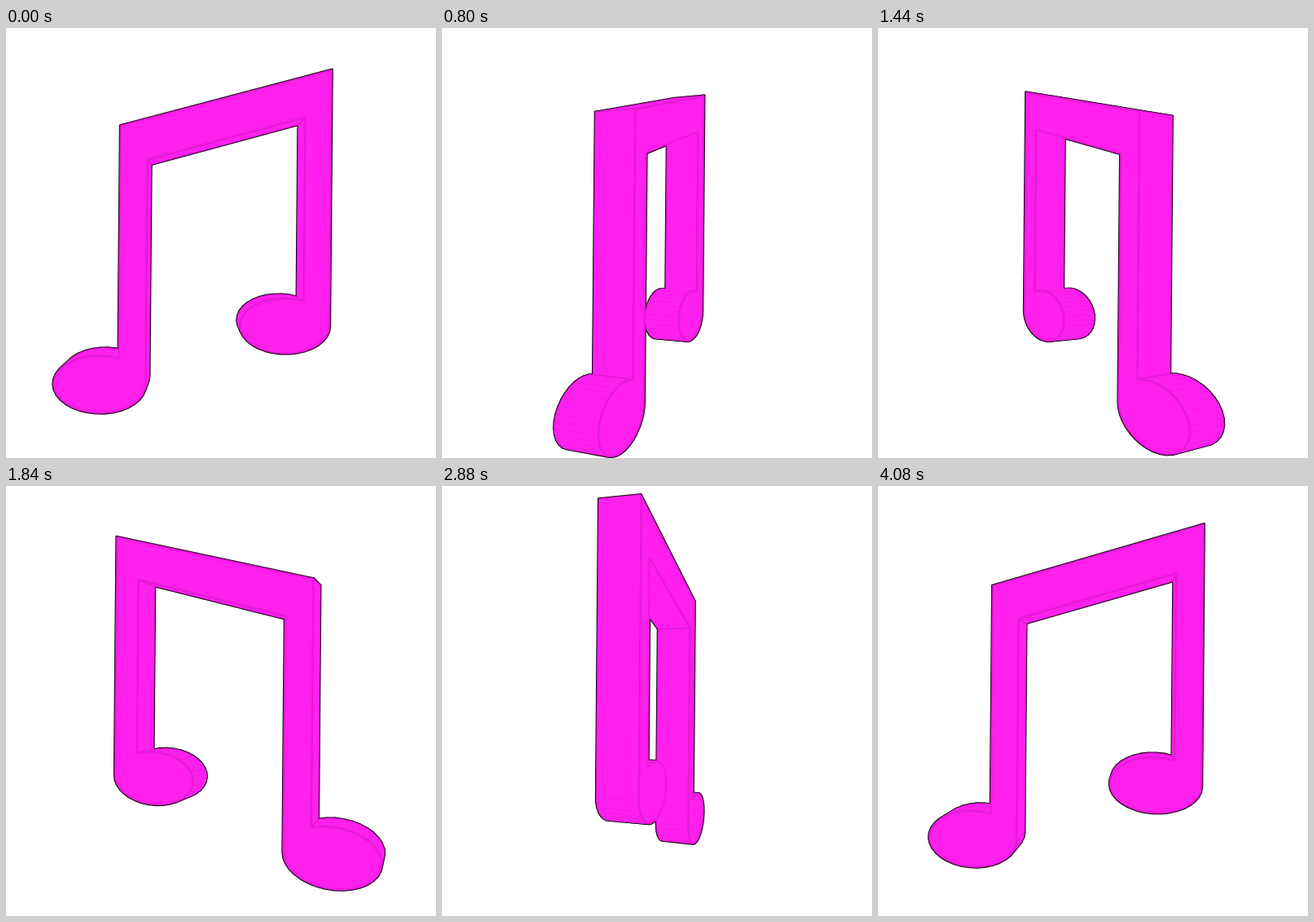
Recreate the animation shown at these times as an HTML page with a canvas. Size 528 by 528 pixels, loop 4160 ms.

```html
<!DOCTYPE html>
<html>
<head>
<meta charset="utf-8">
<title>Turning note</title>
<style>
html, body { margin: 0; width: 100%; height: 100%; overflow: hidden; background: #fff; }
canvas { display: block; }
</style>
</head>
<body>
<canvas id="stage" width="528" height="528"></canvas>
<script>
const ctx = document.getElementById('stage').getContext('2d');
const STEP = 80, STEPS = 52;
const EYE = 680, HALF = 22.5;
const MID_X = 262, MID_Y = 252;
const PINK = '#ff20ee', SHADE = 'rgba(140,0,130,0.16)';

// Outline of the note, clockwise, seen from the front
const outline = [];

function corner(x, y) {
  outline.push({ x, y, sharp: true });
}

// Note head: from its right end, below and around, up to the stem at stemX
function head(cx, cy, rx, ry, stemX) {
  const end = 2 * Math.PI - Math.acos((stemX - cx) / rx);
  const n = 28;
  for (let i = 0; i <= n; i++) {
    const a = end * i / n;
    outline.push({ x: cx + rx * Math.cos(a), y: cy + ry * Math.sin(a), sharp: i === n });
  }
}

corner(-119, -120.5);
corner(132.5, -186);
head(78.25, 103.5, 54.25, 31.5, 100);
corner(100, -131);
corner(-86, -81.5);
head(-140.5, 172.5, 54.5, 33, -119);

function project(p, z, angle) {
  const c = Math.cos(angle), s = Math.sin(angle);
  const depth = z * c - p.x * s;
  const k = EYE / (EYE - depth);
  const x = (p.x * c + z * s) * k;
  const y = p.y * (k + 0.055);
  return {
    x: MID_X + x - 0.0085 * y,
    y: MID_Y + y + x * (0.013 + 0.00007 * p.y),
    depth
  };
}

function area(pts) {
  return pts.reduce((sum, p, i) => {
    const q = pts[(i + 1) % pts.length];
    return sum + p.x * q.y - q.x * p.y;
  }, 0);
}

function trace(pts) {
  ctx.beginPath();
  pts.forEach(p => ctx.lineTo(p.x, p.y));
  ctx.closePath();
}

function stroke(color, width) {
  ctx.strokeStyle = color;
  ctx.lineWidth = width;
  ctx.stroke();
}

function paint(pts) {
  trace(pts);
  ctx.fillStyle = PINK;
  ctx.fill();
  stroke(PINK, 0.6);
}

function crease(a, b) {
  ctx.beginPath();
  ctx.moveTo(a.x, a.y);
  ctx.lineTo(b.x, b.y);
  stroke(SHADE, 1.5);
}

function draw(angle) {
  const front = outline.map(p => project(p, HALF, angle));
  const back = outline.map(p => project(p, -HALF, angle));
  const n = outline.length;

  const sides = [];
  for (let i = 0; i < n; i++) {
    const j = (i + 1) % n;
    const pts = [front[i], front[j], back[j], back[i]];
    if (area(pts) < 0) {
      sides.push({ pts, i, j, depth: pts.reduce((d, p) => d + p.depth, 0) });
    }
  }
  sides.sort((a, b) => a.depth - b.depth);

  const caps = [];
  if (area(front) > 0) caps.push(front);
  if (area(back) < 0) caps.push(back);

  ctx.fillStyle = '#fff';
  ctx.fillRect(0, 0, 528, 528);
  ctx.lineJoin = 'round';

  for (const pts of sides.map(s => s.pts).concat(caps)) {
    trace(pts);
    stroke('#000', 2.6);
  }
  for (const { pts, i, j } of sides) {
    paint(pts);
    crease(pts[0], pts[1]);
    crease(pts[2], pts[3]);
    if (outline[i].sharp) crease(pts[0], pts[3]);
    if (outline[j].sharp) crease(pts[1], pts[2]);
  }
  for (const pts of caps) {
    paint(pts);
    ctx.save();
    ctx.clip();
    stroke('rgba(140,0,130,0.08)', 6);
    stroke(SHADE, 2.5);
    ctx.restore();
  }
}

function tick() {
  const step = Math.floor(performance.now() / STEP) % STEPS;
  const turn = 2 * Math.PI * step / STEPS;
  draw(turn + 0.035 - 0.044 * Math.sin(turn));
  requestAnimationFrame(tick);
}
tick();
</script>
</body>
</html>
```
